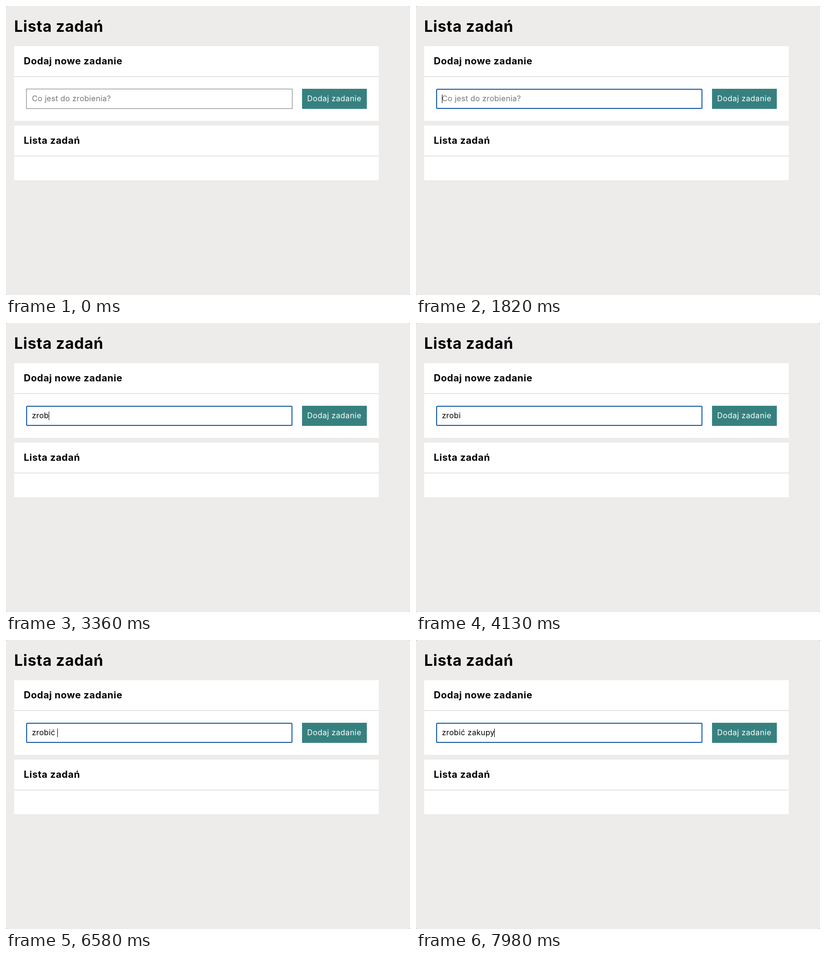
Recreate the animation shown at these times as an HTML page. Size 842x604 px, loop 8 s.

```html
<!DOCTYPE html>
<html lang="pl">
<head>
<meta charset="utf-8">
<title>Lista zadań</title>
<style>
  html, body { margin: 0; width: 100%; height: 100%; overflow: hidden; background: #eeebeb; }
  svg { display: block; width: 842px; height: 604px; }
  text {
    font: 16px Inter, "Open Sans", sans-serif;
    font-optical-sizing: none;
    letter-spacing: .018em;
    white-space: pre;
  }
  .title { font-size: 32px; font-weight: 700; letter-spacing: .022em; }
  .head { font-size: 20px; font-weight: 700; letter-spacing: .027em; }
  .label { fill: #fff; letter-spacing: .027em; }
  .card { fill: #fff; }
  .rule { fill: #ccc; }
</style>
</head>
<body>
<svg viewBox="0 0 842 604">
  <rect width="842" height="604" fill="#66635f"/>
  <rect width="842" height="604" rx="2" fill="#eeebeb"/>
  <text class="title" x="17" y="54">Lista zadań</text>

  <rect class="card" x="17" y="84" width="760" height="156"/>
  <rect class="rule" x="17" y="147" width="760" height="1"/>
  <text class="head" x="37" y="122">Dodaj nowe zadanie</text>
  <rect id="field" fill="#fff"/>
  <text id="value" x="54" y="199"></text>
  <rect id="caret" y="185" width="1" height="18"/>
  <rect x="617" y="173" width="135" height="42" fill="#368180"/>
  <text class="label" x="627.5" y="199">Dodaj zadanie</text>

  <rect class="card" x="17" y="250" width="760" height="114"/>
  <rect class="rule" x="17" y="313" width="760" height="1"/>
  <text class="head" x="37" y="288">Lista zadań</text>
</svg>
<script>
  const LOOP = 8000, FOCUS = 1820, BLINK = 560;
  const TASK = "zrobić zakupy", HINT = "Co jest do zrobienia?";
  // Time of each key press, in ms
  const KEYS = [2380, 3080, 3220, 3360, 3570, 6090, 6300, 6650, 6860, 7140, 7280, 7420, 7910];

  const [field, value, caret] = ["field", "value", "caret"].map(id => document.getElementById(id));

  function set(el, attrs) {
    for (const name in attrs) el.setAttribute(name, attrs[name]);
  }

  function drawField(focused) {
    const inset = focused ? 1 : .5;
    set(field, {
      x: 42 + inset, y: 173 + inset,
      width: 555 - 2 * inset, height: 42 - 2 * inset,
      rx: focused ? 1.5 : 0,
      stroke: focused ? "#165ba8" : "#767676",
      "stroke-width": 2 * inset
    });
  }

  function render(t) {
    const focused = t >= FOCUS;
    const count = KEYS.filter(k => k <= t).length;
    drawField(focused);

    const shown = count ? TASK.slice(0, count) : HINT;
    if (value.textContent !== shown) value.textContent = shown;
    set(value, { fill: count ? "#000" : "#757575" });

    // Every key press restarts the blink
    const since = t - (count ? KEYS[count - 1] : FOCUS);
    const lit = focused && Math.floor(since / BLINK) % 2 === 0;
    const end = count ? value.getComputedTextLength() : 0;
    set(caret, { x: Math.floor(54 + end), visibility: lit ? "visible" : "hidden" });
  }

  const start = performance.now();
  function tick() {
    render((performance.now() - start) % LOOP);
    requestAnimationFrame(tick);
  }
  render(0);
  requestAnimationFrame(tick);
</script>
</body>
</html>
```
